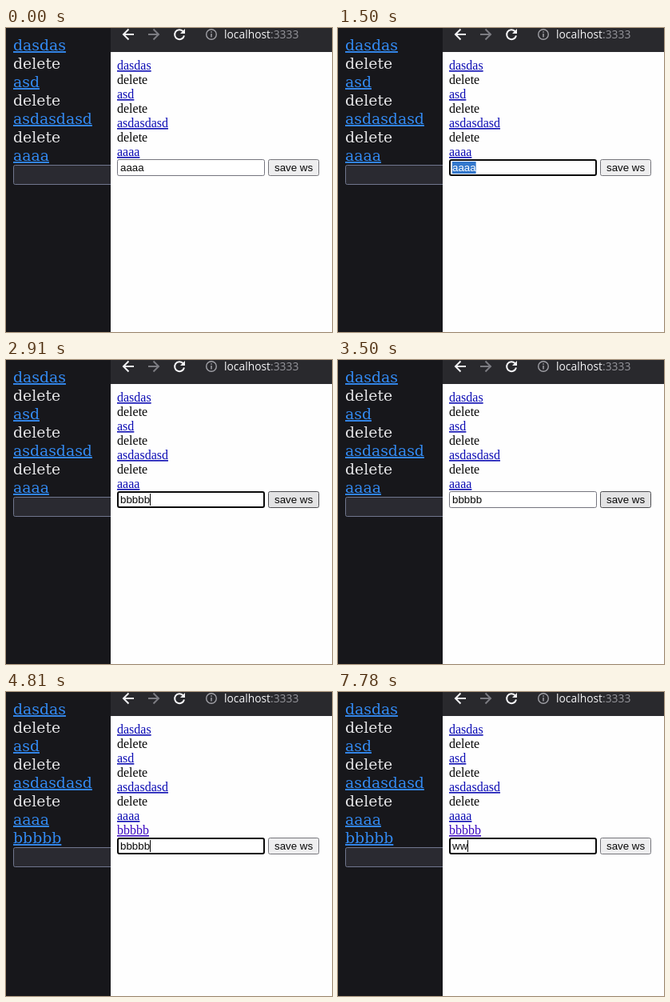
Recreate the animation shown at these times as an HTML page. Size 408 by 380 pixels, loop 8 s.

```html
<!DOCTYPE html>
<html lang="en">
<head>
<meta charset="utf-8">
<title>Live list</title>
<style>
  html, body { margin: 0; width: 100%; height: 100%; overflow: hidden; background: #17171b; }
  svg { display: block; }
  text { white-space: pre; }
  .dark { font: 18.85px "DejaVu Serif", serif; fill: #e4e4e6; }
  .dark .link { fill: #338af2; text-decoration: underline; }
  .light { font: 16px "Liberation Serif", serif; fill: #080808; }
  .light .link { fill: #0c0cb4; text-decoration: underline; }
  .light .fresh { fill: #3a08c0; }
  .ui { font: 13.333px "Liberation Sans", sans-serif; fill: #080808; }
  .url { font: 13.85px "Open Sans", sans-serif; fill: #f4f4f6; }
</style>
</head>
<body>
<svg width="408" height="380" viewBox="0 0 408 380">
  <rect width="408" height="380" fill="#17171b"/>
  <g id="dark" class="dark"></g>
  <rect id="darkInput" x="9.5" y="171.5" width="140" height="24" rx="2" fill="#2a2a31" stroke="#70768e"/>

  <rect x="131" width="277" height="380" fill="#fefefe"/>
  <rect x="131" width="277" height="30" fill="#29292d"/>
  <g fill="none" stroke-width="2">
    <path d="M160 8H147.5M153.5 1.5L147 8l6.500 6.500" stroke="#f4f4f6"/>
    <path d="M178 8H190.500M184.500 1.500L191 8l-6.500 6.500" stroke="#7c7c82"/>
    <path d="M221.500 4A6 6 0 1 0 223 9.500" stroke="#f4f4f6"/>
    <circle cx="257" cy="8" r="6.300" stroke="#a0a0a6" stroke-width="1.400"/>
    <path d="M257 7v4.500M257 4.300v1.500" stroke="#a0a0a6" stroke-width="1.500"/>
  </g>
  <path d="M224 1v6h-6z" fill="#f4f4f6"/>
  <text class="url" x="273" y="13">localhost<tspan fill="#96969c">:3333</tspan></text>

  <g id="light" class="light"></g>
  <g id="form" class="ui">
    <rect id="field" fill="#fff"/>
    <rect id="mark" y="167" height="15" fill="#3478cc"/>
    <text x="143" y="179"><tspan id="plain"></tspan><tspan id="picked" fill="#fff"></tspan></text>
    <rect id="caret" y="167" width="1" height="15" fill="#000"/>
    <rect id="button" x="328.500" y="164.500" width="63" height="20" rx="2"/>
    <text x="336" y="179">save ws</text>
  </g>
</svg>
<script>
const LOOP = 8000;
const ADDED = 3530;
const ROWS = ["dasdas", "delete", "asd", "delete", "asdasdasd", "delete", "aaaa", "bbbbb"];
// [time, field text]
const TYPED = [[0, "aaaa"], [2070, "b"], [2300, "bb"], [2500, "bbb"], [2690, "bbbb"],
               [2830, "bbbbb"], [7480, "w"], [7780, "ww"]];
const $ = id => document.getElementById(id);
const within = (t, a, b) => t >= a && t < b;

function set(id, attrs) {
  for (const key in attrs) $(id).setAttribute(key, attrs[key]);
}

// Adds all rows and returns the last one
function addRows(id, x, y, step) {
  return ROWS.map((word, i) => {
    const row = document.createElementNS("http://www.w3.org/2000/svg", "text");
    row.setAttribute("x", x);
    row.setAttribute("y", y + i * step);
    if (word !== "delete") row.classList.add("link");
    row.textContent = word;
    $(id).append(row);
    return row;
  }).pop();
}

const newRows = [addRows("dark", 9, 28, 23), addRows("light", 139, 52, 18)];
newRows.forEach(row => row.classList.add("fresh"));

const EM = { a: 0.556, b: 0.556, w: 0.722 };
const textWidth = s => [...s].reduce((sum, c) => sum + EM[c] * 13.333, 0);

function selectedCount(t, length) {
  if (within(t, 1130, 2070)) return Math.min(length, Math.floor((t - 1130) / 40) + 1);
  return within(t, 5330, 7480) ? length : 0;
}

function draw(t) {
  const added = t >= ADDED;
  newRows.forEach(row => row.setAttribute("visibility", added ? "visible" : "hidden"));
  set("darkInput", { y: added ? 194.5 : 171.5 });
  set("form", { transform: `translate(0 ${added ? 18 : 0})` });

  const value = TYPED.filter(([at]) => at <= t).pop()[1];
  const count = selectedCount(t, value.length);
  const plain = value.slice(0, value.length - count);
  $("plain").textContent = plain;
  $("picked").textContent = value.slice(plain.length);
  const end = 143 + textWidth(plain);
  set("mark", { x: end, width: textWidth(value) - textWidth(plain) });

  const focused = within(t, 850, 3390) || t >= 4740;
  const overField = within(t, 530, 850) || within(t, 3940, 4740);
  set("field", focused
    ? { x: 140, y: 165, width: 183, height: 19, rx: 2, stroke: "#0a0a0a", "stroke-width": 2 }
    : { x: 139.5, y: 164.5, width: 184, height: 20, rx: 2, "stroke-width": 1,
        stroke: overField ? "#48484c" : "#74747e" });
  set("caret", { x: Math.floor(end), visibility: focused && !count ? "visible" : "hidden" });

  const overButton = within(t, 2910, 3940);
  set("button", {
    fill: overButton ? "#e3e3e4" : "#eeeeef",
    stroke: overButton ? "#4c4c50" : "#76767c"
  });
}

function tick() {
  draw(performance.now() % LOOP);
  requestAnimationFrame(tick);
}
tick();
</script>
</body>
</html>
```
